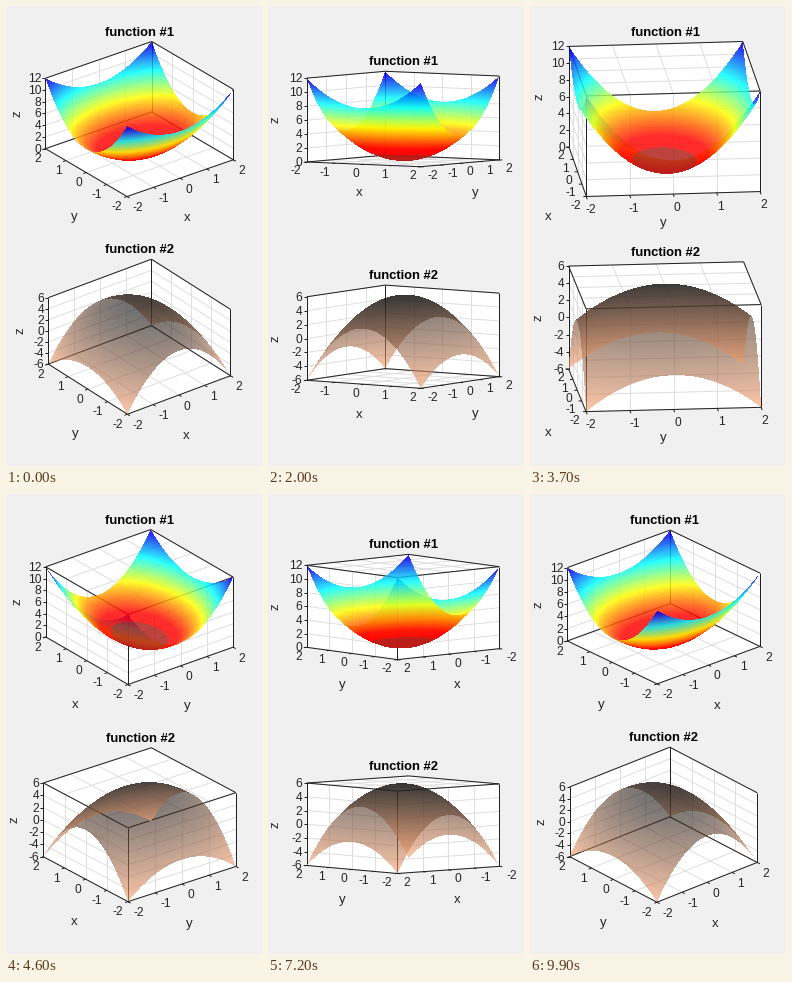
These frames come from a looping animation (256 px wide and 460 px high, 10000 ms). A matplotlib script:

```python
import numpy as np
import matplotlib.pyplot as plt
from matplotlib.animation import FuncAnimation
from matplotlib.collections import LineCollection, PolyCollection
from matplotlib.colors import LinearSegmentedColormap

W, H, DPI = 256, 460, 80
FRAMES, INTERVAL = 100, 100
SQUASH, TALL = 0.9, 0.607    # vertical scale of depth and of z
FIT_W, FIT_H = 192.5, 155
HALF = 80                    # half height of a surface image
INK = (0.13, 0.13, 0.13)
GRID = (0.87, 0.87, 0.87)
PX = 72 / DPI

plt.rcParams["font.family"] = "Liberation Sans"
plt.rcParams["axes.unicode_minus"] = False

fig = plt.figure(figsize=(W / DPI, H / DPI), dpi=DPI, facecolor="#f0f0f0")
ax = fig.add_axes([0, 0, 1, 1])
ax.axis("off")

RAINBOW = LinearSegmentedColormap.from_list("rainbow", [
    (0, "#ff0000"), (0.16, "#ff0000"), (0.43, "#ffff00"),
    (0.69, "#00ffff"), (0.95, "#0000f0"), (1, "#0000d0")])
CLAY = LinearSegmentedColormap.from_list(
    "clay", [(0.98, 0.63, 0.43), (0.07, 0.07, 0.07)])


def sign(v):
    return 1 if v >= 0 else -1


class View:
    """Orthographic view of a unit box, fitted into its panel."""

    def __init__(self, az, el, cy):
        self.c, self.s = np.cos(np.radians(az)), np.sin(np.radians(az))
        self.el = el
        sin_e, cos_e = np.sin(np.radians(el)), np.cos(np.radians(el))
        span = abs(self.c) + abs(self.s)
        tall = SQUASH * abs(sin_e) * span + TALL * cos_e
        self.k = min(FIT_W / span, FIT_H / tall)
        self.depth = self.k * SQUASH * sin_e
        self.rise = self.k * TALL * cos_e
        self.cx = 135 - 1.6 * np.clip((abs(el) - 14) / 16, 0, 1)
        self.cy = cy
        self.top = cy - self.k * tall / 2

    def __call__(self, x, y, z):
        across = x * self.c + y * self.s
        away = y * self.c - x * self.s
        return np.array([self.cx + self.k * across,
                         self.cy - self.depth * away - self.rise * z])


class Panel:
    """A box with the surface z = z0 + a x^2 + b y^2 in unit coordinates."""

    def __init__(self, title, coef, zlim, cmap, alpha, cy, low_el):
        self.coef, self.zlim, self.cmap, self.alpha = coef, zlim, cmap, alpha
        self.cy, self.low_el = cy, low_el

        self.back = PolyCollection([], facecolors="white", edgecolors="none")
        self.grid = LineCollection([], colors=[GRID], linewidths=PX)
        self.edges = LineCollection([], colors=[INK], linewidths=PX)
        for order, art in enumerate((self.back, self.grid, self.edges)):
            art.set_zorder(order)
            ax.add_collection(art, autolim=False)

        top = int(cy) - HALF
        self.px, self.py = np.meshgrid(np.arange(W) + 0.5,
                                       np.arange(top, top + 2 * HALF) + 0.5)
        blank = np.zeros(self.px.shape + (4,))
        self.far, self.near = (
            ax.imshow(blank, extent=(0, W, top + 2 * HALF, top), zorder=z,
                      aspect="auto", interpolation="nearest")
            for z in (3, 4))

        self.ticks = range(-2, 3)
        self.zticks = range(zlim[0], zlim[1] + 1, 2)
        self.xt = [self.text(str(t), 12) for t in self.ticks]
        self.yt = [self.text(str(t), 12) for t in self.ticks]
        self.zt = [self.text(str(t), 12, ha="right") for t in self.zticks]
        self.xl, self.yl = self.text("x", 13.2), self.text("y", 13.2)
        self.zl = self.text("z", 13.2, rotation=90)
        self.title = self.text(title, 13, weight="bold", color="black")

    def unit_z(self, z):
        lo, hi = self.zlim
        return (z - lo) / (hi - lo) - 0.5

    def text(self, s, px, ha="center", color=(0.15, 0.15, 0.15), **kw):
        return ax.text(0, 0, s, fontsize=px * PX, ha=ha, va="center",
                       color=color, zorder=5, **kw)

    def floor_axis(self, v, along_x, corner, labels, name):
        """Ticks and labels on one of the two lower box edges."""
        lx, ly = corner

        def at(u):
            return v(u, ly, -0.5) if along_x else v(lx, u, -0.5)

        mid = at(0)
        out = mid - v(0, 0, -0.5)
        out = out / max(np.hypot(*out), 1e-6)
        marks = []
        for t, label in zip(self.ticks, labels):
            p = at(t / 4)
            marks.append([p, p + 3 * out])
            reach = 9 + (2.5 if t < 0 else 0)
            label.set_position((p[0] + reach * out[0] + 0.7,
                                p[1] + 9 + 5 * out[1]))
        run, drop = abs(at(0.5) - at(-0.5))
        share = run / (v.k * (abs(v.c) + abs(v.s)))
        side = sign(mid[0] - v.cx)
        name.set_position((mid[0] + side * (34.5 - 50 * share) + 0.7,
                           mid[1] + 27.5 + 0.35 * drop))
        return marks

    def draw_box(self, v):
        above = v.el >= 0
        fx, fy = -sign(v.s) / 2, sign(v.c) / 2      # far walls
        fz = -0.5 if above else 0.5                 # far floor or ceiling
        h = 0.5
        square = [(-h, -h), (h, -h), (h, h), (-h, h)]
        self.back.set_verts([[v(fx, a, b) for a, b in square],
                             [v(a, fy, b) for a, b in square],
                             [v(a, b, fz) for a, b in square]])

        lines = []
        for t in self.ticks:
            u = t / 4
            lines += [[v(u, -h, fz), v(u, h, fz)], [v(-h, u, fz), v(h, u, fz)],
                      [v(u, fy, -h), v(u, fy, h)], [v(fx, u, -h), v(fx, u, h)]]
        for t in self.zticks:
            z = self.unit_z(t)
            lines += [[v(fx, -h, z), v(fx, h, z)], [v(-h, fy, z), v(h, fy, z)]]
        self.grid.set_segments(lines)

        edges = [[v(fx, -h, z), v(fx, h, z)] for z in (-h, h)]
        edges += [[v(-h, fy, z), v(h, fy, z)] for z in (-h, h)]
        edges += [[v(-fx, -h, fz), v(-fx, h, fz)],
                  [v(-h, -fy, fz), v(h, -fy, fz)]]
        edges += [[v(x, y, -h), v(x, y, h)]
                  for x, y in ((fx, fy), (-fx, fy), (fx, -fy))]

        flip = -1 if above else 1
        corner = flip * fx, flip * fy
        edges += self.floor_axis(v, True, corner, self.xt, self.xl)
        edges += self.floor_axis(v, False, corner, self.yt, self.yl)

        zx, zy = -sign(v.c) / 2, -sign(v.s) / 2     # leftmost corner
        for t, label in zip(self.zticks, self.zt):
            p = v(zx, zy, self.unit_z(t))
            edges.append([p, p - (3, 0)])
            label.set_position((p[0] - 4.2, p[1] + 1))
        p = v(zx, zy, 0)
        self.zl.set_position((p[0] - 32 + 0.13 * abs(v.el), p[1]))
        self.edges.set_segments(edges)
        self.title.set_position((v.cx + 0.5, v.top - 9))

    def draw_surface(self, v):
        """Meet the line of sight through every pixel with the paraboloid."""
        z0, a, b = self.coef
        c, s = v.c, v.s
        p = (self.px - v.cx) / v.k
        qa = v.rise * (a * s * s + b * c * c)
        qb = v.depth + 2 * v.rise * p * c * s * (b - a)
        qc = (v.rise * (z0 + p * p * (a * c * c + b * s * s))
              - (v.cy - self.py))
        disc = qb * qb - 4 * qa * qc
        root = np.sqrt(np.maximum(disc, 0)) / (2 * abs(qa))
        for image, q in ((self.far, -qb / (2 * qa) + root),
                         (self.near, -qb / (2 * qa) - root)):
            x, y = p * c - q * s, p * s + q * c
            t = z0 + a * x * x + b * y * y + 0.5
            rgba = self.cmap(np.clip(t, 0, 1))
            if a > 0 and image is self.near:
                # the outside of the bowl is dull around its lowest point
                spot = (0.45 * (t < 0.09))[..., None]
                rgba[..., :3] += spot * ((0.3, 0.25, 0.2) - rgba[..., :3])
            inside = (disc >= 0) & (abs(x) <= 0.5) & (abs(y) <= 0.5)
            rgba[..., 3] = self.alpha * inside
            image.set_data(rgba)

    def update(self, i):
        el = self.low_el + 1.31 * abs(i - 50.4)
        v = View(-37.5 + 360 * i / FRAMES, el, self.cy)
        self.draw_box(v)
        self.draw_surface(v)


panels = [
    Panel("function #1", (-0.5, 4 / 3, 8 / 3), (0, 12),
          RAINBOW, 0.83, 113, -36),
    Panel("function #2", (0.5, -8 / 3, -4 / 3), (-6, 6),
          CLAY, 0.6, 330.7, -33.3),
]
ax.set_xlim(0, W)
ax.set_ylim(H, 0)


def draw(i):
    for p in panels:
        p.update(i)
    return []


anim = FuncAnimation(fig, draw, frames=FRAMES, interval=INTERVAL,
                     init_func=lambda: draw(0), repeat=True, repeat_delay=0)
plt.show()
```
